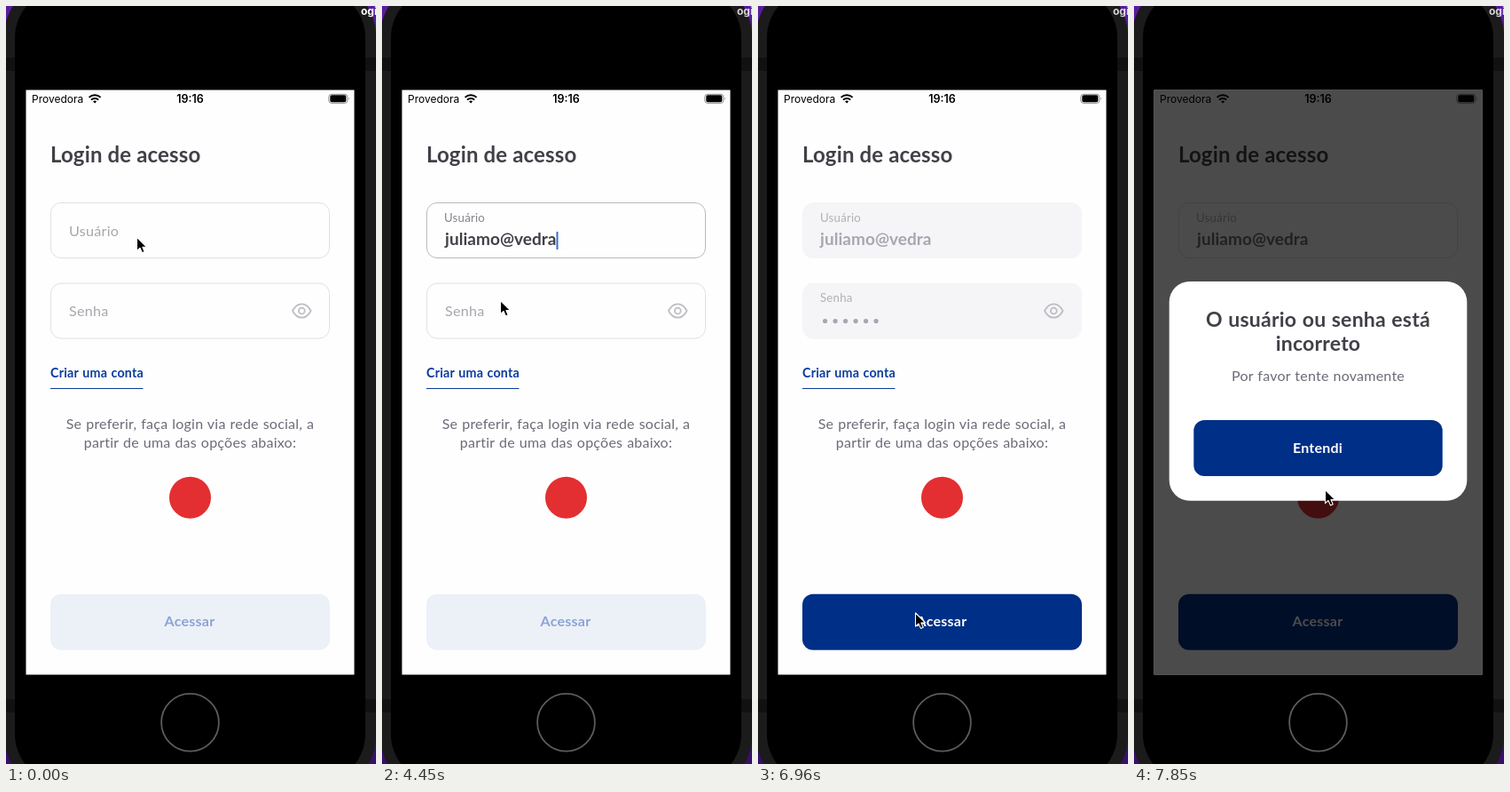
These frames come from a looping animation (417x853 px, 8000 ms). An HTML page:

```html
<!DOCTYPE html>
<html lang="pt-BR">
<head>
<meta charset="utf-8">
<title>Login de acesso</title>
<style>
  html, body { margin: 0; width: 100%; height: 100%; overflow: hidden; background: #3a0d6e; }
  svg { display: block; width: 417px; height: 853px; }
  text { font-family: Lato, "Open Sans", sans-serif; font-size: 16px; letter-spacing: .23px; word-spacing: .6px; }
  .bold { font-weight: 700; }
  .mid { text-anchor: middle; }
  .ios { font-family: Inter, Roboto, sans-serif; letter-spacing: 0; font-size: 12px; }
  .title { font-size: 24px; letter-spacing: .15px; word-spacing: 0; fill: #404048; }
  .head { font-size: 23px; fill: #404048; }
  .soft { fill: #6b6b78; }
  .typed { font-size: 19px; letter-spacing: .05px; }
  .box { rx: 11.5px; stroke-width: 1; }
  .caret { fill: #3f6bd8; }
</style>
</head>
<body>
<svg viewBox="0 0 417 853">
  <defs>
    <linearGradient id="wall" x1="0" y1="0" x2="0" y2="1">
      <stop offset="0" stop-color="#581d9f"/>
      <stop offset="1" stop-color="#37106a"/>
    </linearGradient>
    <clipPath id="screen"><rect x="22.5" y="94.5" width="370" height="658"/></clipPath>
  </defs>

  <rect width="417" height="853" fill="url(#wall)"/>
  <rect x="-2" y="-30" width="419" height="915" rx="64" fill="#1b1b1c"/>
  <path d="M0 58h10v15H0zM405 58h12v15h-12zM0 780h10v15H0zM405 780h12v15h-12z" fill="#111"/>
  <rect x="10" y="-20" width="395" height="895" rx="56"/>
  <text id="tab" class="ios bold" x="400" y="10" fill="#fff">ogin</text>
  <circle cx="207.5" cy="806.3" r="32.4" fill="none" stroke="#5c5c5c" stroke-width="1.8"/>

  <g clip-path="url(#screen)">
    <rect x="22" y="94" width="371" height="659" fill="#fefefe"/>

    <text class="ios" x="29" y="109">Provedora</text>
    <g fill="none" stroke="#000" stroke-width="2">
      <path d="M93.6 102.9a9.3 9.3 0 0 1 13 0M96 105.6a5.9 5.9 0 0 1 8.2 0"/>
      <path d="M100.1 109.6l-2-2.1a2.9 2.9 0 0 1 4 0z" fill="#000" stroke="none"/>
    </g>
    <text class="ios mid" x="207.5" y="109" font-weight="600" style="font-size:12.5px">19:16</text>
    <rect x="363.8" y="99.3" width="21" height="10" rx="3" fill="none" stroke="#8a8a8a"/>
    <rect x="365.3" y="100.3" width="18" height="8" rx="1.8"/>
    <path d="M386 102.6q1.7 1.7 0 3.4z" fill="#8a8a8a"/>

    <text class="title bold" x="50" y="176">Login de acesso</text>

    <g id="user">
      <rect class="box" x="50.5" y="221.5" width="314" height="62"/>
      <text class="label"></text>
      <text class="typed bold" y="269"></text>
      <rect class="caret" width="2"/>
    </g>
    <g id="pass" transform="translate(0 90.6)">
      <rect class="box" x="50.5" y="221.5" width="314" height="62"/>
      <text class="label"></text>
      <g class="dots"></g>
      <rect class="caret" width="2"/>
    </g>
    <g fill="none" stroke="#bcbcc2" stroke-width="1.7">
      <path d="M323 343q4-7.7 10.3-7.7t10.3 7.7q-4 7.7-10.3 7.7t-10.3-7.7z" stroke-linejoin="round"/>
      <circle cx="333.3" cy="343" r="3.4"/>
    </g>

    <text class="bold" x="50" y="417.5" fill="#0b3b9c" style="font-size:14.3px">Criar uma conta</text>
    <rect x="50" y="430" width="104.5" height="1" fill="#0b3b9c"/>

    <text class="soft mid" x="207.5" y="475.5">Se preferir, faça login via rede social, a</text>
    <text class="soft mid" x="207.5" y="497">partir de uma das opções abaixo:</text>
    <circle cx="207.5" cy="553.2" r="23.5" fill="#e32f31"/>

    <rect id="send" x="50" y="661.7" width="315" height="63" rx="12"/>
    <text id="sendText" class="bold mid" x="207" y="698.4">Acessar</text>

    <rect id="shade" x="22" y="94" width="371" height="659"/>

    <g id="modal">
      <rect x="39.7" y="310" width="335.6" height="246.7" rx="23" fill="#fff"/>
      <text class="head bold mid" x="207.5" y="360.5">O usuário ou senha está</text>
      <text class="head bold mid" x="207.5" y="388">incorreto</text>
      <text class="soft mid" x="207.5" y="422">Por favor tente novamente</text>
      <rect x="67.3" y="466" width="280.4" height="63" rx="12" fill="#002f87"/>
      <text class="bold mid" x="207" y="502.5" fill="#fff">Entendi</text>
    </g>
  </g>

  <path id="mouse" d="M0 0V15.2L3.5 12 5.9 17.4 8.7 16.2 6.4 11H11.2Z" stroke="#fff" stroke-width="1.1" stroke-linejoin="round"/>
</svg>
<script>
const LOOP = 8000;
const LOGIN = 'juliamo@vedra';
const $ = (s, root = document) => root.querySelector(s);
const set = (el, attrs) => { for (const k in attrs) el.setAttribute(k, attrs[k]); };
const lerp = (a, b, p) => a + (b - a) * p;

// Each step changes only the listed parts of the state.
const start = { focus: '', caret: 0, lift: 0, lift2: 0, chars: 0, dots: 0, ready: 0, locked: 0, fade: 0, x: 147.5, y: 260.3, dim: 0 };
const steps = [
  [300, { dim: 1 }],
  [750, { caret: 1 }],
  [1050, { focus: 'user', lift: .15 }],
  [1500, { lift: 1, chars: 1 }],
  [1800, { chars: 3 }],
  [2100, { chars: 5 }],
  [2240, { chars: 6 }],
  [2390, { chars: 7 }],
  [2830, { chars: 8 }],
  [3570, { chars: 9 }],
  [3720, { chars: 10 }],
  [3870, { chars: 11 }],
  [4010, { chars: 12 }],
  [4160, { chars: 13, x: 146, y: 272 }],
  [4310, { x: 138, y: 312 }],
  [4450, { x: 133.5, y: 331.5 }],
  [4600, { x: 128, y: 336 }],
  [4750, { focus: 'pass', lift2: .15 }],
  [4900, { lift2: .8 }],
  [5040, { lift2: 1, x: 127.5 }],
  [5640, { dots: 2, ready: 1 }],
  [5790, { dots: 3 }],
  [5930, { dots: 4 }],
  [6080, { dots: 5 }],
  [6230, { dots: 6 }],
  [6380, { x: 136, y: 410 }],
  [6520, { x: 158, y: 560 }],
  [6670, { x: 174, y: 668 }],
  [6810, { x: 177.5, y: 683 }],
  [6960, { focus: '', locked: 1 }],
  [7260, { locked: 0, fade: .19, y: 680 }],
  [7410, { fade: .88 }],
  [7560, { fade: 1, x: 186, y: 645 }],
  [7700, { x: 206, y: 578 }],
  [7850, { x: 215.5, y: 544.5 }]
];

const dots = $('#pass .dots');
for (let i = 0; i < 6; i++) {
  const dot = document.createElementNS('http://www.w3.org/2000/svg', 'circle');
  set(dot, { cx: 76.6 + i * 11.5, cy: 264, r: 2.6 });
  dots.append(dot);
}

function drawField(id, name, s, lift, width) {
  const root = $('#' + id), on = s.focus === id;
  const label = $('.label', root);
  set($('.box', root), {
    fill: s.locked ? '#f5f5f7' : '#fefefe',
    stroke: s.locked ? '#f5f5f7' : on ? '#b9b9be' : '#e0e0e4'
  });
  label.textContent = name;
  label.style.fontSize = lerp(16.2, 13.2, lift) + 'px';
  set(label, {
    x: lerp(71, 70, lift),
    y: lerp(258.6, 242.6, lift),
    fill: lift < 1 ? '#a6a6ad' : on ? '#83838c' : '#b0b0b6'
  });
  const low = lift === 1;
  const visible = s.caret && (on || (id === 'user' && !s.focus && !s.chars));
  set($('.caret', root), {
    x: 71 + width, y: low ? 254 : 243, height: low ? 20 : 18,
    visibility: visible ? 'visible' : 'hidden'
  });
}

function draw(t) {
  const s = { ...start };
  for (const [at, change] of steps) if (t >= at) Object.assign(s, change);

  const ink = id => s.locked ? '#a7a7b0' : s.focus === id ? '#404048' : '#6b6b78';
  const typed = $('#user .typed');
  typed.textContent = LOGIN.slice(0, s.chars);
  set(typed, { x: s.locked ? 70 : 71, fill: ink('user') });
  drawField('user', 'Usuário', s, s.lift, s.chars ? typed.getComputedTextLength() : 0);

  set(dots, { fill: ink('pass'), transform: `translate(${s.locked ? -1 : 0})` });
  [...dots.children].forEach((dot, i) => set(dot, { opacity: i < s.dots ? 1 : 0 }));
  drawField('pass', 'Senha', s, s.lift2, s.dots * 11.2);

  set($('#send'), { fill: s.ready ? '#002f87' : '#ecf1f8' });
  set($('#sendText'), { fill: s.ready ? '#fff' : '#8aa3d4' });
  set($('#shade'), { opacity: s.fade * .7 });
  set($('#modal'), { transform: `translate(0 ${(1 - s.fade) * 658})` });
  set($('#mouse'), { transform: `translate(${s.x} ${s.y})` });
  set($('#tab'), { opacity: s.dim ? .82 : 1 });
}

const t0 = performance.now();
function tick() {
  draw((performance.now() - t0) % LOOP);
  requestAnimationFrame(tick);
}
tick();
</script>
</body>
</html>
```
